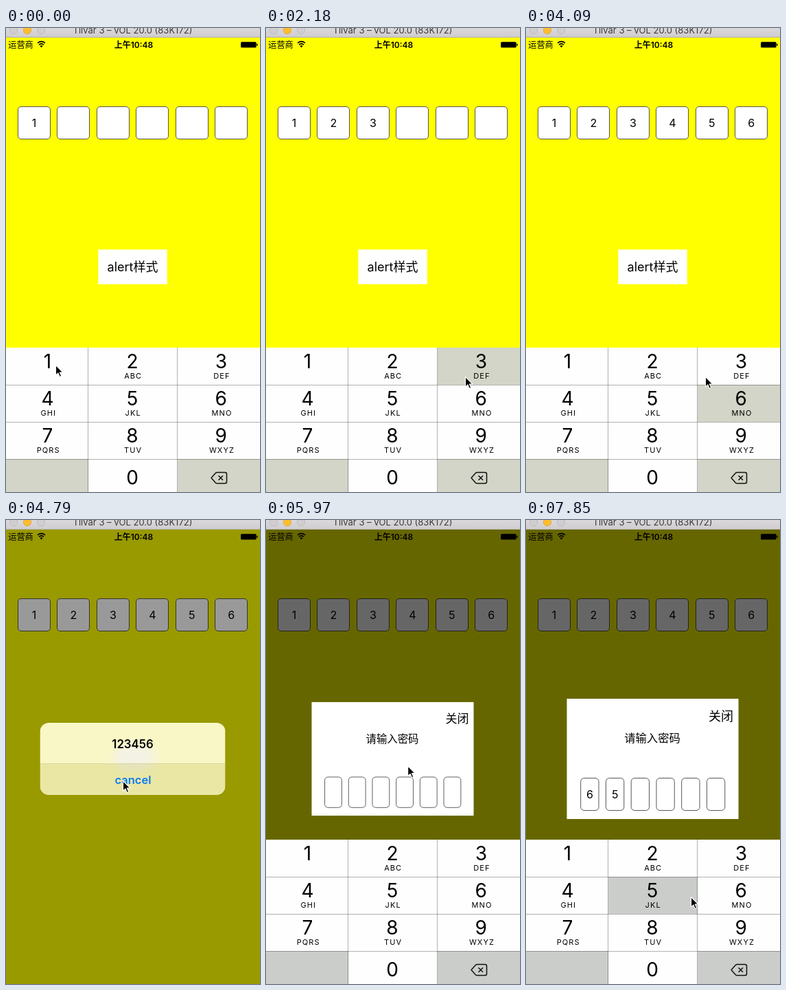
An HTML page that plays this animation: 370x675 px, repeating every 8000 ms.

```html
<!DOCTYPE html>
<html lang="zh-CN">
<head>
<meta charset="utf-8">
<style>
  html, body { margin: 0; width: 100%; height: 100%; overflow: hidden; background: #ff0; }
  svg { display: block; width: 370px; height: 675px; }
  text { font-family: Inter, "Noto Sans CJK SC", "Noto Sans CJK", sans-serif; text-anchor: middle; }
  .cell { fill: #fff; stroke: #444; stroke-width: .9; }
</style>
</head>
<body>
<svg id="stage" viewBox="0 0 370 675" xmlns="http://www.w3.org/2000/svg"></svg>
<script>
const LOOP = 8000;
const BEAT = 145; // ms between picture changes; all times below are in beats
const CX = 184.5, CY = 347.5;
const POPUP_AT = 40;

// Where the cursor stops and which key it presses there
const STOPS = [
  { at: -1, x: 72, y: 490, key: 1 },
  { at: 7, x: 181, y: 498 },
  { at: 9, x: 181, y: 498, key: 2 },
  { at: 15, x: 290, y: 507, key: 3 },
  { at: 21, x: 85, y: 545, key: 4 },
  { at: 25, x: 178, y: 540, key: 5 },
  { at: 28, x: 261, y: 507, key: 6 },
  { at: 33, x: 170, y: 379 },
  { at: 39.4, x: 205, y: 355 },
  { at: 50, x: 290, y: 528, key: 6 },
  { at: 54, x: 240, y: 548, key: 5 }
];
const taps = STOPS.filter(s => s.key);
const pageTaps = taps.filter(s => s.at < POPUP_AT);
const popupTaps = taps.filter(s => s.at >= POPUP_AT);

const text = (x, y, size, str, extra = '') =>
  `<text x="${x}" y="${y}" font-size="${size}" ${extra}>${str}</text>`;
const rect = (x, y, w, h, extra = '') =>
  `<rect x="${x}" y="${y}" width="${w}" height="${h}" ${extra}/>`;
const range = (n, fn) => Array.from({ length: n }, (_, i) => fn(i)).join('');

function keyboard() {
  const letters = ',ABC,DEF,GHI,JKL,MNO,PQRS,TUV,WXYZ'.split(',');
  const keys = letters.map((label, i) => {
    const col = i % 3, y = 465 + 54 * Math.floor(i / 3), mid = 60.5 + 126.4 * col - (col === 1 ? 2.9 : 0);
    return rect(col ? 130 * col - 10 : 0, y, 130, 54, `id="key${i + 1}"`) +
      text(mid, y + 30, 28, i + 1) +
      text(mid + 1.2, y + 45, 11, label, 'letter-spacing="1.1"');
  }).join('');
  return `<g id="keyboard">${rect(0, 465, 370, 212, 'fill="#fefefe"')}
    <g id="greyKeys">${rect(0, 627, 120, 50)}${rect(250, 627, 120, 50)}</g>
    ${keys}${text(184, 664, 28, 0)}
    <path d="M0 519.5H370M0 573.5H370M0 627.5H370M119.5 465V677M249.5 465V677" stroke="#000" stroke-opacity=".3" fill="none"/>
    <path d="M299 654.5L305.2 647.6Q306.2 646.5 307.7 646.5H319Q321.5 646.5 321.5 649V660Q321.5 662.5 319 662.5H307.7Q306.2 662.5 305.2 661.4Z
      M309.5 651.2L316 657.7M316 651.2L309.5 657.7" fill="none" stroke="#111" stroke-width="1.5" stroke-linejoin="round"/></g>`;
}

const statusBar = () => `
  ${text(21.5, 28.5, 12.2, '运营商')}
  <path d="M46 21.8Q51.5 17.4 57 21.8M48 24.3Q51.5 21.4 55 24.3" fill="none" stroke="#000" stroke-width="1.7"/>
  <path d="M49.4 26.1Q51.5 24.4 53.6 26.1L51.5 28.4Z"/>
  ${text(186, 28.5, 12, '上午10:48', 'font-weight="600"')}
  ${rect(342, 20.3, 22.6, 8.2, 'rx="1.5"')}${rect(365.2, 22.7, 1.4, 3.2, 'rx=".7"')}`;

const titleBar = () => `
  ${rect(0, 0, 370, 13, 'fill="url(#chrome)"')}
  ${rect(0, 13, 370, 1, 'fill="#b4b1a0"')}
  ${range(3, i => `<circle cx="${11 + 20 * i}" cy="3" r="5.6" stroke-width=".8" ${i === 1 ? 'fill="#ffbd2e" stroke="#e2a02c"' : 'fill="#d0ced0" stroke="#b9b7b9"'}/>`)}
  ${text(184.5, 8, 13, 'Tilvar 3 – vOL 20.0 (83K172)', 'fill="#3c3c3c"')}`;

const alertBox = () => `
  <g id="alert">${rect(0, 14, 370, 661, 'fill-opacity=".4"')}
    <g id="alertCard">
      <g clip-path="url(#cardClip)">
        ${rect(49.5, 295, 270, 105, 'fill="#f9f7c6"')}
        <ellipse cx="187" cy="346" rx="47" ry="32" fill="url(#glow)"/>
        ${rect(49.5, 354.5, 270, 46, 'id="cancelShade" fill="#b0ac30" fill-opacity=".22"')}
        ${rect(49.5, 354, 270, .7, 'fill="#cfcc90"')}
      </g>
      ${text(CX, 331.5, 16.8, '123456', 'font-weight="600"')}
      ${text(185, 384, 16.5, 'cancel', 'font-weight="600" fill="#0a7bf5"')}
    </g>
  </g>`;

const popup = () => `
  <g id="popup">${rect(0, 14, 370, 661, 'fill-opacity=".6"')}
    <g id="popupCard">${rect(59.5, 260, 250, 175, 'fill="#fff"')}
      ${text(284, 291.5, 18, '关闭')}${text(184, 323, 16.3, '请输入密码')}
      ${range(6, i => rect(79.7 + 36.75 * i, 375.5, 26.3, 47, 'class="cell" rx="5"'))}
      ${popupTaps.map((tap, i) => text(92.9 + 36.75 * i, 405, 16, tap.key, `id="pin${i}"`)).join('')}
    </g>
  </g>`;

const stage = document.getElementById('stage');
stage.innerHTML = `
  <defs>
    <linearGradient id="chrome" x2="0" y2="1"><stop stop-color="#dad8da"/><stop offset="1" stop-color="#cfcdcf"/></linearGradient>
    <radialGradient id="glow"><stop stop-color="#f4f2e8"/><stop offset=".5" stop-color="#f4f2e4" stop-opacity=".85"/><stop offset="1" stop-color="#f9f7c6" stop-opacity="0"/></radialGradient>
    <clipPath id="cardClip">${rect(49.5, 295, 270, 105, 'rx="13"')}</clipPath>
  </defs>
  ${rect(0, 0, 370, 675, 'fill="#ff0"')}
  ${statusBar()}
  ${range(6, i => rect(Math.round(17 + 57.4 * i) + .5, 114.5, 47, 47, 'class="cell" rx="4.5"'))}
  ${pageTaps.map((tap, i) => text(41 + 57.45 * i, 143.8, 16, tap.key, `id="digit${i}"`)).join('')}
  ${rect(134.5, 322.5, 100, 50, 'fill="#fff" stroke="#ffffb4"')}
  ${text(184.5, 354, 18, 'alert样式')}
  ${popup()}${keyboard()}${alertBox()}${titleBar()}
  <path id="cursor" d="M0 0V14.6L3.4 11.4L5.8 16.9L8.2 15.8L5.8 10.5H10.4Z" stroke="#fff" stroke-width="1.1" stroke-linejoin="round"/>`;

const el = Object.fromEntries([...stage.querySelectorAll('[id]')].map(e => [e.id, e]));
const show = (e, on) => e.setAttribute('visibility', on ? 'inherit' : 'hidden');
const ramp = (t, a, b) => Math.min(1, Math.max(0, (t - a) / (b - a)));
const smooth = p => p * p * (3 - 2 * p);
const easeOut = p => 1 - (1 - p) ** 3;
const zoom = s => `translate(${CX} ${CY}) scale(${s}) translate(${-CX} ${-CY})`;

// Rest one beat either side of each stop, glide in between
function cursorAt(beat) {
  const next = STOPS.find(s => s.at > beat) || STOPS.at(-1);
  const from = STOPS[STOPS.indexOf(next) - 1];
  const p = beat >= next.at ? 1 : smooth(ramp(beat, from.at + 1, next.at - 1));
  return [from.x + (next.x - from.x) * p + .5, from.y + (next.y - from.y) * p + .5];
}

function draw(ms) {
  const beat = Math.floor(ms / BEAT);
  const popupOn = beat >= POPUP_AT;

  pageTaps.forEach((tap, i) => show(el['digit' + i], beat >= tap.at));
  popupTaps.forEach((tap, i) => show(el['pin' + i], beat >= tap.at));

  const grey = popupOn ? '#cbcdcb' : '#d2d5c7';
  el.greyKeys.setAttribute('fill', grey);
  for (let k = 1; k <= 9; k++) {
    const down = taps.some(({ key, at }) => key === k && (beat === at || beat === at - 1));
    el['key' + k].setAttribute('fill', down ? grey : '#fefefe');
  }

  const hidden = smooth(ramp(beat, 28.5, 31)) - easeOut(ramp(beat, 33.5, 36.6));
  el.keyboard.setAttribute('transform', `translate(0 ${212 * hidden})`);

  const appear = smooth(ramp(beat, 28.5, 30.7));
  el.alert.setAttribute('opacity', appear * (1 - ramp(beat, 33.5, 35)));
  el.alertCard.setAttribute('transform', zoom(1.17 - .17 * appear));
  show(el.cancelShade, beat >= 33);

  show(el.popup, popupOn);
  el.popupCard.setAttribute('transform', zoom(easeOut(ramp(beat, 39.5, 41.93))));

  el.cursor.setAttribute('transform', `translate(${cursorAt(beat)})`);
}

const start = performance.now();
function frame() {
  draw((performance.now() - start) % LOOP);
  requestAnimationFrame(frame);
}
frame();
</script>
</body>
</html>
```
